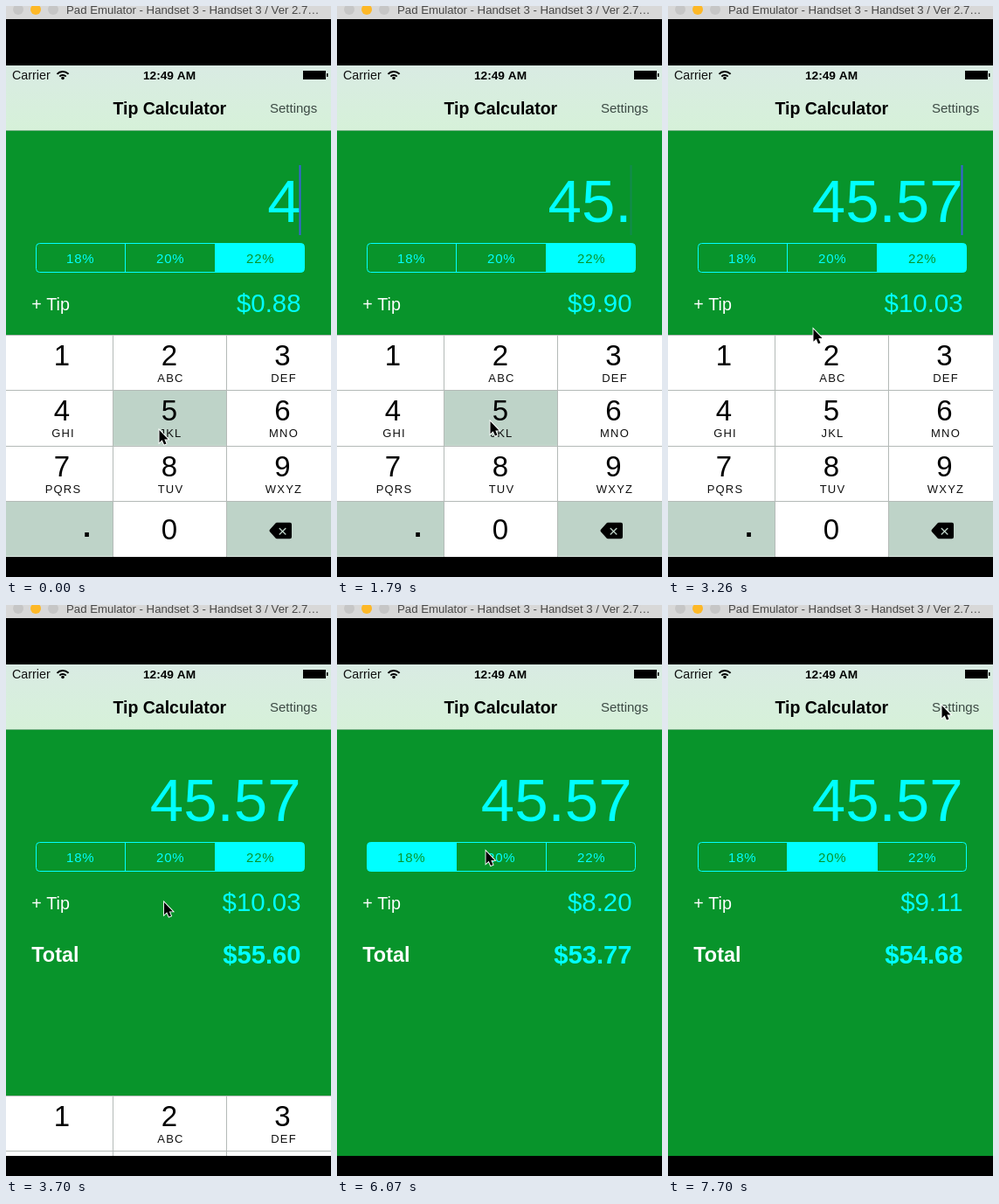
These frames come from a looping animation (372x653 px, 7990 ms). An HTML page with a canvas:

```html
<!DOCTYPE html>
<html lang="en">
<head>
<meta charset="utf-8">
<title>Tip Calculator</title>
<style>
  html, body { margin: 0; height: 100%; overflow: hidden; background: #000; }
  canvas { display: block; }
</style>
</head>
<body>
<canvas id="stage" width="372" height="653"></canvas>
<script>
const ctx = document.getElementById('stage').getContext('2d');
const LOOP = 7990, TICK = 147.8; // the screen refreshes once per tick
const GREEN = '#08942b', CYAN = '#00ffff', KEY_GREY = '#bed3c8';
const RATES = [.18, .20, .22];
const KEYBOARD_TOP = 376, KEYBOARD_HEIGHT = 254;

// The pointer travels to each stop, holds it down, then releases. Times are in ticks.
const STOPS = [
  { key: '5', x: 175.5, y: 485, travel: 1, arrive: 0, hold: 1, release: 1 },
  { key: '.', x: 51.5, y: 614.5, travel: 2, arrive: 3, hold: 1, release: 8 },
  { key: '5', x: 175.5, y: 475, travel: 3, arrive: 11, hold: 1, release: 13 },
  { key: '7', x: 88, y: 529, travel: 3, arrive: 16, hold: 1, release: 19 },
  { dismiss: true, x: 181, y: 340, travel: 4, arrive: 23, hold: 1, release: 25 },
  { segment: 1, x: 191.5, y: 290, travel: 4, arrive: 30, hold: 1, release: 32 },
  { segment: 0, x: 67, y: 290.5, travel: 1, arrive: 33, hold: 2, release: 38 },
  { segment: 1, x: 170.5, y: 281.5, travel: 2, arrive: 41, hold: 2, release: 45 },
  { x: 313.5, y: 115, travel: 6, arrive: 52, hold: 0, release: 54 }
];

const clamp = v => Math.min(1, Math.max(0, v));
const smooth = p => p * p * (3 - 2 * p);

function pointerAt(tick) {
  let { x, y } = STOPS[0];
  for (const stop of STOPS) {
    const p = smooth(clamp((tick - stop.arrive) / stop.travel + 1));
    x += (stop.x - x) * p;
    y += (stop.y - y) * p;
  }
  return { x, y };
}

function stateAt(tick) {
  const done = STOPS.filter(s => s.release <= tick);
  const held = STOPS.find(s => tick < s.release && tick >= s.release - s.hold) || {};
  const typed = done.filter(s => s.key);
  const chosen = done.filter(s => s.segment >= 0).pop();
  const dismissed = done.find(s => s.dismiss);

  // Typing restarts the caret blink
  const idle = tick - (typed.length ? typed[typed.length - 1].release : 0);
  const caret = dismissed || idle >= 5 && tick > 19 ? 0 : clamp(Math.abs(idle - 5) - .8);
  // The keyboard slides out within two ticks, slowing down
  const slide = dismissed ? 1 - .27 * Math.max(0, 1 - (tick - dismissed.release)) : 0;

  return {
    bill: '4' + typed.map(s => s.key).join(''),
    selected: chosen ? chosen.segment : 2,
    touched: held.segment,
    pressed: held.key,
    caret,
    drop: Math.round(KEYBOARD_HEIGHT * slide)
  };
}

function rect(x, y, w, h, color) {
  ctx.fillStyle = color;
  ctx.fillRect(x, y, w, h);
}

function circle(x, y, r, color) {
  ctx.fillStyle = color;
  ctx.beginPath();
  ctx.arc(x, y, r, 0, 7);
  ctx.fill();
}

function text(str, x, y, size, color, { align = 'left', bold = false, spacing = 0 } = {}) {
  ctx.font = `${bold ? 'bold ' : ''}${size}px "Liberation Sans", Arial, sans-serif`;
  ctx.letterSpacing = spacing + 'px';
  ctx.textAlign = align;
  ctx.fillStyle = color;
  ctx.fillText(str, x, y);
}

function polygon(points) {
  ctx.beginPath();
  points.forEach(([x, y]) => ctx.lineTo(x, y));
  ctx.closePath();
}

function drawBars() {
  rect(0, 0, 372, 15, '#d8d8d8');
  ['#c6c6c6', '#fdb827', '#c6c6c6'].forEach((color, i) => circle(14 + 20 * i, 4, 6, color));
  text('Pad Emulator - Handset 3 - Handset 3 / Ver 2.7…', 69, 9, 13.2, '#484848');

  const tint = ctx.createLinearGradient(0, 68, 0, 142);
  tint.addColorStop(0, '#d9ebe3');
  tint.addColorStop(1, '#d6f1d9');
  rect(0, 68, 372, 74, tint);
  rect(0, 142, 372, 1, '#6fae80');

  text('Carrier', 7, 84, 14.3, '#111');
  text('12:49 AM', 187, 84, 13.7, '#000', { align: 'center', bold: true });
  text('Tip Calculator', 187.3, 124, 19.5, '#000', { align: 'center', bold: true });
  text('Settings', 302, 122, 15, '#3c4a44');

  ctx.strokeStyle = '#000';
  ctx.lineWidth = 2;
  [5, 9].forEach(r => {
    ctx.beginPath();
    ctx.arc(65, 84, r, -Math.PI * .76, -Math.PI * .24);
    ctx.stroke();
  });
  circle(65, 82.5, 1.8, '#000');

  rect(340, 74, 26, 10, '#000');
  rect(367, 77, 1.5, 4, '#000');
}

function drawSegments(selected, touched) {
  ctx.save();
  ctx.beginPath();
  ctx.roundRect(34.5, 271.5, 307, 33, 4);
  ctx.strokeStyle = CYAN;
  ctx.lineWidth = 1;
  ctx.stroke();
  ctx.clip();
  RATES.forEach((rate, i) => {
    const x = 33 + i * 103;
    if (i === selected) rect(x, 271, 104, 34, CYAN);
    else if (i === touched) rect(x, 271, 104, 34, 'rgba(0,255,255,.13)');
    if (i) rect(x, 271, 1, 34, CYAN);
  });
  ctx.restore();
  RATES.forEach((rate, i) => text(Math.round(rate * 100) + '%', 85.3 + i * 103, 293.5, 15,
    i === selected ? GREEN : CYAN, { align: 'center', spacing: .8 }));
}

function drawDeleteIcon() {
  ctx.fillStyle = ctx.strokeStyle = '#000';
  ctx.lineJoin = 'round';
  ctx.lineWidth = 4;
  polygon([[303.5, 600], [310, 592.8], [325, 592.8], [325, 607.2], [310, 607.2]]);
  ctx.fill();
  ctx.stroke();
  text('×', 316.5, 606.5, 19, KEY_GREY, { align: 'center' });
}

function drawKeyboard(drop, pressed) {
  const edges = [0, 122.5, 252.5, 372], centers = [64, 187, 316.5], rowHeight = 63.4;
  const letters = ' ABC DEF GHI JKL MNO PQRS TUV WXYZ'.split(' ');
  ctx.save();
  ctx.beginPath();
  ctx.rect(0, KEYBOARD_TOP, 372, KEYBOARD_HEIGHT);
  ctx.clip();
  ctx.translate(0, drop);
  rect(0, KEYBOARD_TOP, 372, KEYBOARD_HEIGHT, '#fff');
  [...'123456789.0<'].forEach((label, i) => {
    const col = i % 3, row = (i - col) / 3, top = row * rowHeight;
    if (label === pressed || '.<'.includes(label))
      rect(edges[col], KEYBOARD_TOP + top, edges[col + 1] - edges[col], rowHeight, KEY_GREY);
    if (label === '.') text(label, 92.5, 607, 33, '#000', { align: 'center', bold: true });
    else if (label === '<') drawDeleteIcon();
    else text(label, centers[col], (row < 3 ? 411 : 420) + top, 33, '#000', { align: 'center' });
    if (i < 9) text(letters[i], centers[col] + 1.5, 429.7 + top, 13, '#111', { align: 'center', spacing: 1.2 });
  });
  for (let row = 0; row < 4; row++)
    rect(0, Math.round(KEYBOARD_TOP + row * rowHeight), 372, 1, '#b4bab7');
  [122, 252].forEach(x => rect(x, KEYBOARD_TOP, 1, KEYBOARD_HEIGHT, '#b4bab7'));
  ctx.restore();
}

function drawPointer({ x, y }) {
  ctx.save();
  ctx.translate(x, y);
  polygon([[0, 0], [0, 14.2], [3.2, 11.3], [5.5, 16.6], [8, 15.6], [5.8, 10.4], [10, 10.4]]);
  ctx.lineJoin = 'miter';
  ctx.lineWidth = 1.8;
  ctx.strokeStyle = '#fff';
  ctx.stroke();
  ctx.fillStyle = '#000';
  ctx.fill();
  ctx.restore();
}

function draw(tick) {
  const { bill, selected, touched, pressed, caret, drop } = stateAt(tick);
  const amount = parseFloat(bill), tip = amount * RATES[selected];

  rect(0, 0, 372, 653, '#000');
  rect(0, 142, 372, 488, GREEN);
  drawBars();

  text(bill, 337.5, 247, 69, CYAN, { align: 'right' });
  ctx.globalAlpha = caret;
  rect(335.5, 182, 2, 80, '#3c5fdc');
  ctx.globalAlpha = 1;

  drawSegments(selected, touched);
  text('+ Tip', 29.3, 348, 19.7, '#fff');
  text('$' + tip.toFixed(2), 337.5, 349.5, 29.4, CYAN, { align: 'right' });
  text('Total', 29.3, 408, 23.4, '#fff', { bold: true });
  text('$' + (amount + tip).toFixed(2), 337.5, 409.7, 29.2, CYAN, { align: 'right', bold: true });

  if (drop < KEYBOARD_HEIGHT) drawKeyboard(drop, pressed);
  drawPointer(pointerAt(tick));
}

function frame() {
  draw(Math.floor(performance.now() % LOOP / TICK));
  requestAnimationFrame(frame);
}
frame();
</script>
</body>
</html>
```
